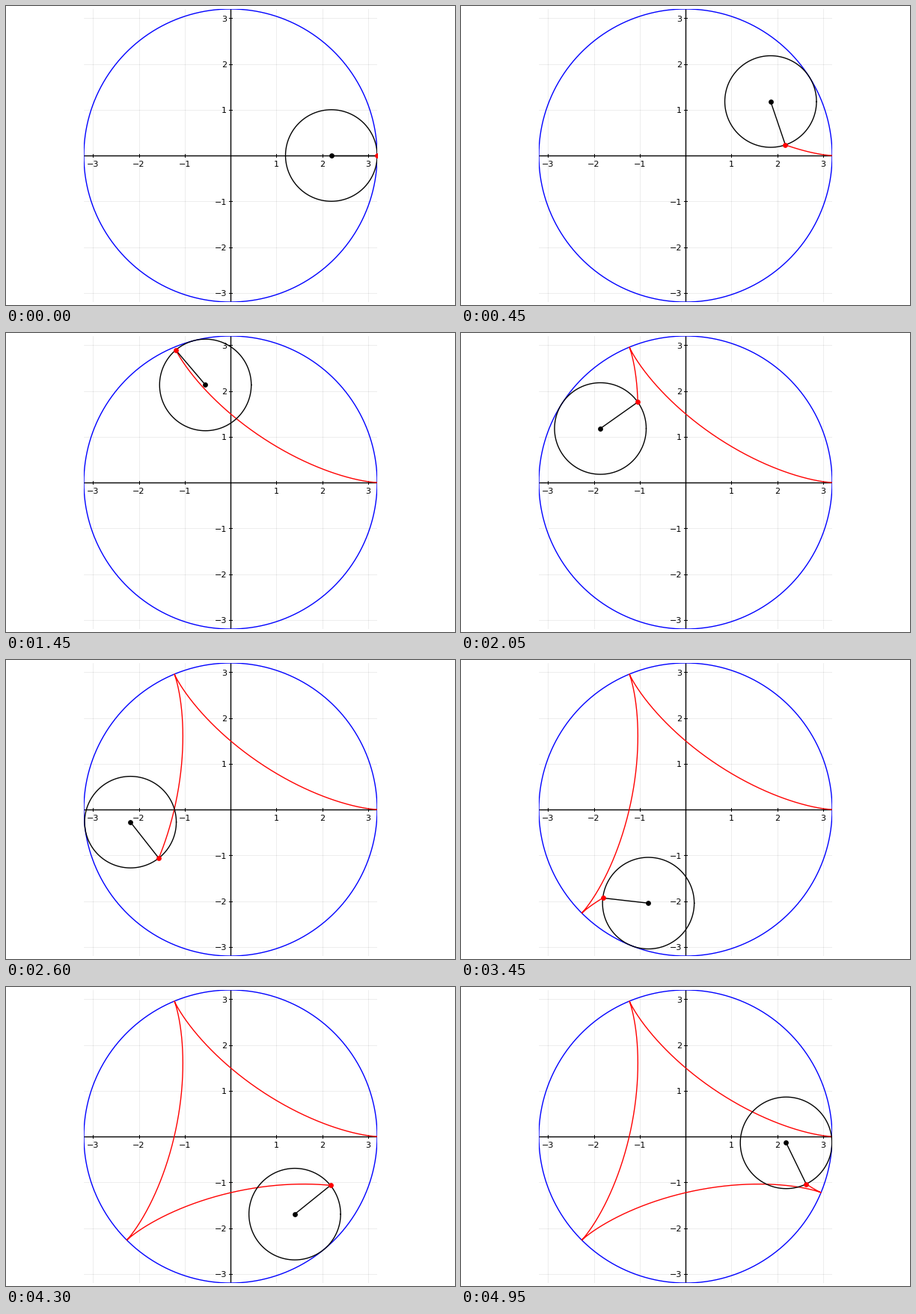
These frames come from a looping animation (600 px wide and 400 px high, 5000 ms). A matplotlib script:

```python
import numpy as np
import matplotlib.pyplot as plt
from matplotlib.animation import FuncAnimation

W, H, DPI = 600, 400, 100
FRAMES, INTERVAL = 100, 50
BIG, SMALL = 3.2, 1.0
GAP = BIG - SMALL
SIDE = 392               # plot area in pixels
PX = 2 * BIG / SIDE      # one pixel in data units

plt.rcParams["font.family"] = "DejaVu Sans"
fig = plt.figure(figsize=(W / DPI, H / DPI), dpi=DPI, facecolor="white")
ax = fig.add_axes([104 / W, 4 / H, SIDE / W, SIDE / H])
ax.set_xlim(-BIG, BIG)
ax.set_ylim(-BIG, BIG)
ax.axis("off")


def line(x, y, color, width=1.0, **kw):
    return ax.plot(x, y, color=color, lw=width, **kw)[0]


def center(t):
    return GAP * np.cos(t), GAP * np.sin(t)


def tracer(t):
    """Point on the rolling circle: a hypocycloid."""
    spin = GAP / SMALL * t
    cx, cy = center(t)
    return cx + SMALL * np.cos(spin), cy - SMALL * np.sin(spin)


def draw_axes():
    ticks = [v for v in range(-3, 4) if v]
    for v in ticks:
        line([v, v], [-BIG, BIG], "black", 0.5, alpha=0.1)
        line([-BIG, BIG], [v, v], "black", 0.5, alpha=0.1)
    line([-BIG, BIG], [0, 0], "black")
    line([0, 0], [-BIG, BIG], "black")
    tick = 2.35 * PX
    for v in ticks:
        line([v, v], [-tick, tick], "black", 0.7)
        line([-tick, tick], [v, v], "black", 0.7)
        label = str(v).replace("-", "\u2212")
        ax.text(v, -15 * PX, label, size=8, ha="center", va="baseline", zorder=1.9)
        ax.text(-5 * PX, v - 4.5 * PX, label, size=8, ha="right", va="baseline", zorder=1.9)


draw_axes()
angle = np.linspace(0, 2 * np.pi, 361)
ring_x, ring_y = np.cos(angle), np.sin(angle)

line(BIG * ring_x, BIG * ring_y, "blue")
trail = line([], [], "red")
wheel = line([], [], "black")
arm = line([], [], "black")
hub = line([], [], "black", marker="o", ms=4.9, mew=0)
pen = line([], [], "red", marker="o", ms=4.9, mew=0)


def update(i):
    t = 2 * np.pi * i / FRAMES
    cx, cy = center(t)
    px, py = tracer(t)
    trail.set_data(*tracer(np.linspace(0, t, 8 * i + 1)))
    wheel.set_data(cx + SMALL * ring_x, cy + SMALL * ring_y)
    arm.set_data([cx, px], [cy, py])
    hub.set_data([cx], [cy])
    pen.set_data([px], [py])
    return trail, wheel, arm, hub, pen


anim = FuncAnimation(fig, update, frames=FRAMES, interval=INTERVAL,
                     repeat=True, repeat_delay=0, blit=False)
plt.show()
```
